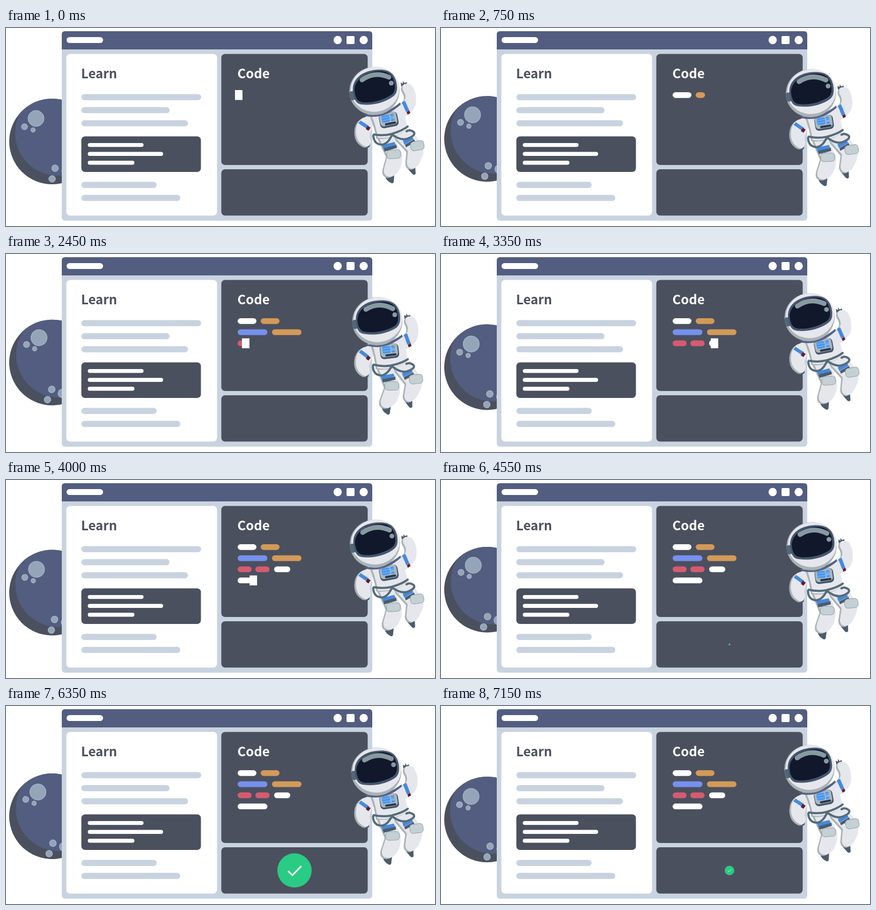
An HTML page that plays this animation: 800x370 px, repeating every 7.2 s.

```html
<!DOCTYPE html>
<html lang="en">
<head>
<meta charset="utf-8">
<title>Learn and code</title>
<style>
  html, body { margin: 0; height: 100%; overflow: hidden; background: #fff; }
  svg { display: block; width: 100%; height: 100%; }
  text { font: bold 24px "Noto Sans CJK JP", "Noto Sans CJK SC", "Noto Sans CJK", "Noto Sans", sans-serif; }
  .suit { fill: #e6e7ed; }
  .shade { fill: #a9b3b5; }
  .slate { fill: #4a5c6d; }
  .blue { fill: #4489e0; }
  .pad { fill: #c4d0d3; stroke: #91a1a8; }
  .strap { fill: none; stroke: #566b78; stroke-width: 4; stroke-linecap: round; stroke-linejoin: round; }
</style>
</head>
<body>
<svg viewBox="0 0 800 370">
  <defs>
    <clipPath id="disc"><circle r="80"/></clipPath>
    <path id="armL" d="M662 170Q651 178 651 194Q651 212 664 220Q671 225 676 220Q681 214 677 205Q676 200 680 191L685 177L676 164Z"/>
    <path id="armR" d="M733 148L741 166Q761 157 763 141Q765 121 755 108Q749 103 741 106Q736 110 739 118Q745 126 743 134Z"/>
    <path id="torso" d="M680 164L735 142Q743 164 748 190Q720 209 692 206Q689 186 680 164Z"/>
    <path id="legL" d="M694 206L722 204L737 236Q739 255 731 268Q721 282 709 278Q701 274 704 262L710 240Z"/>
    <path id="legR" d="M722 203L751 188L773 216Q781 231 773 246Q767 262 757 264Q747 264 746 253L748 231Z"/>
  </defs>

  <g id="moon">
    <circle r="80" fill="#4b505e"/>
    <circle cx="11" cy="-16" r="80" fill="#525d80" clip-path="url(#disc)"/>
    <g id="craters" fill="#95a5b9" stroke="#b0bdcc"></g>
  </g>

  <rect x="104" y="6" width="579" height="354" rx="6" fill="#c9d3e0"/>
  <path d="M104 40V12Q104 6 110 6H677Q683 6 683 12V40Z" fill="#525d80"/>
  <g fill="#fff">
    <rect x="113" y="17" width="68" height="11" rx="5.5"/>
    <circle cx="618.5" cy="22.5" r="7.7"/>
    <rect x="635" y="15" width="15" height="15" rx="2"/>
    <circle cx="667" cy="22.5" r="7.7"/>
    <rect x="112.500" y="48.500" width="281" height="302" rx="7"/>
  </g>
  <g fill="#4b505e">
    <rect x="401.500" y="48.500" width="273" height="207.500" rx="7"/>
    <rect x="401.500" y="264" width="273" height="86.500" rx="7"/>
    <rect x="140.500" y="202.500" width="223" height="66.500" rx="7"/>
    <text x="140" y="94">Learn</text>
  </g>
  <text x="431.500" y="94" fill="#fff">Code</text>
  <g id="lesson"></g>
  <g id="code"></g>
  <rect id="cursor" width="14" height="18.500" fill="#fff"/>
  <g id="tick">
    <circle r="32" fill="#2acb84"/>
    <path d="M-12 1L-4 9L12.500 -8" fill="none" stroke="#fff" stroke-width="3"/>
  </g>

  <g id="astronaut">
    <g class="slate">
      <path d="M707 277L724 274L723 288Q721 292 717 289Q709 285 707 277Z"/>
      <path d="M749 263L763 259L764 272Q762 276 758 273Z"/>
      <path d="M737 109L736 102L740 104L740 99L743 103L747 101L749 109Z"/>
      <path d="M666 218L679 215L678 222Q673 226 667 222Z"/>
    </g>
    <g id="body"></g>
    <g class="blue">
      <path d="M661 173L677 183L674 189L657 178Z"/>
      <path d="M738 139L744 136L752 154L746 157Z"/>
      <path d="M701 219L724 213L727 218L704 226Z"/>
      <path d="M740 211L757 202L760 208L743 218Z"/>
    </g>
    <path d="M674 183L680 186L676 192L671 189ZM747 157L752 154L754 159L749 162Z" fill="#681d2c"/>
    <path class="slate" d="M704 225L728 218L729 224L706 231ZM744 218L761 208L763 213L746 223Z"/>
    <g class="strap">
      <path d="M686 199Q704 202 719 198Q739 192 749 184"/>
      <path d="M685 201Q686 218 702 218Q713 216 720 199"/>
      <path d="M720 199Q739 213 753 205Q765 199 760 194Q753 189 747 193"/>
    </g>
    <rect class="pad" x="-13" y="-8" width="26" height="16" rx="6" transform="translate(723 236) rotate(-4)"/>
    <rect class="pad" x="-12.500" y="-8.500" width="25" height="17" rx="6" transform="translate(767 220) rotate(-10)"/>

    <g transform="translate(713 171) rotate(-11)">
      <rect x="-17" y="-12.500" width="35" height="27" rx="7" fill="#46566a"/>
      <rect x="-16" y="-13" width="32" height="24" rx="6" fill="#aab7bd"/>
      <rect x="-12" y="-9" width="15" height="13" rx="3" fill="#4597f3"/>
      <path d="M5 -9H11V-3H5ZM5 -1H11V4H5Z" fill="#4597f3"/>
      <path d="M-11 -5H11M-11 0H11" stroke="#86bdf8"/>
      <rect x="-8" y="6" width="21" height="4" rx="2" fill="#29374b"/>
    </g>

    <path d="M666 161Q704 166 735 139L736 143Q706 171 672 165Z" fill="#596086"/>
    <ellipse class="shade" cx="687" cy="117.500" rx="47" ry="45" transform="rotate(-12 687 117)"/>
    <ellipse class="suit" cx="688" cy="114.500" rx="45.500" ry="42" transform="rotate(-12 688 114)"/>
    <rect x="641" y="118" width="10" height="17" rx="4" fill="#536778" transform="rotate(-12 646 126)"/>
    <path d="M647 119C644 96 664 80 691 78C714 76 724 85 728 101C731 116 729 124 719 130C704 140 683 145 664 143C652 142 649 132 647 119Z" fill="#46566e"/>
    <path d="M650 119C648 99 667 84 691 81C711 79 720 86 724 101C727 114 725 122 715 127C700 136 682 140 666 139C655 138 652 130 650 119Z" fill="#11182b"/>
    <path d="M664 97Q687 80 714 92" fill="none" stroke="#8799a1" stroke-width="9" stroke-linecap="round"/>
    <circle cx="718.500" cy="103" r="4.500" fill="#8799a1"/>
  </g>
</svg>
<script>
const LOOP = 7200, FLOAT = 3600, BLINK = 800;
const WHITE = '#fff', GREY = '#c9d3e0', ORANGE = '#d39a59', BLUE = '#7690ee', RED = '#d55b70';
const $ = id => document.getElementById(id);
const clamp = x => Math.min(1, Math.max(0, x));

function add(parent, tag, attrs) {
  const el = document.createElementNS('http://www.w3.org/2000/svg', tag);
  for (const k in attrs) el.setAttribute(k, attrs[k]);
  return $(parent).appendChild(el);
}

const pill = (parent, x, end, y, h, fill) =>
  add(parent, 'rect', { x, y: y - h / 2, width: end - x, height: h, rx: h / 2, fill });

// Lesson lines: right end, middle
for (const [end, y] of [[364, 129.3], [305, 153.6], [339.5, 178], [281, 293.3], [325, 317.6]])
  pill('lesson', 140.5, end, y, 11.5, GREY);
for (const [end, y] of [[256.5, 218.6], [293, 235.2], [239.5, 251.8]])
  pill('lesson', 152.5, end, y, 7.4, WHITE);

// Craters relative to the moon's centre
for (const [cx, cy, r] of [[-30, -43, 15], [-51.5, -27.5, 5.7], [-35.5, -21.5, 4.2],
                           [5.5, 50, 6.3], [0, 70, 6.2], [26, 55, 8]])
  add('craters', 'circle', { cx, cy, r });

// Each part of the suit has a shaded left side
for (const part of ['legR', 'legL', 'armR', 'armL', 'torso']) {
  add('body', 'use', { href: '#' + part, class: 'shade', x: -1.5, y: 1 });
  add('body', 'use', { href: '#' + part, class: 'suit', x: 1.5, y: -1 });
}

// Typed lines: start and end time, then bars of [left, right, colour]
const lines = [
  [0, 970, [432, 467, WHITE], [475, 510, ORANGE]],
  [970, 2264, [432, 487.5, BLUE], [496, 551, ORANGE]],
  [2264, 3664, [432, 458, RED], [465, 491.5, RED], [500, 530, WHITE]],
  [3664, 4350, [432, 487.5, WHITE]]
].map(([from, to, ...bars], i) => {
  const y = 125.3 + i * 20.8;
  return {
    from, to, y, left: bars[0][0], right: bars.at(-1)[1],
    bars: bars.map(([x, end, fill]) => ({ x, end, el: pill('code', x, end, y, 10.8, fill) }))
  };
});

function type(t) {
  for (const { from, to, y, left, right, bars } of lines) {
    const head = left + (right - left) * clamp((t - from) / (to - from));
    for (const { x, end, el } of bars)
      el.setAttribute('width', Math.max(0, Math.min(head, end) - x));
    if (t >= from && t < to) {
      $('cursor').setAttribute('x', head - 5);
      $('cursor').setAttribute('y', y - 9.3);
    }
  }
  const shown = t < lines.at(-1).to && t % BLINK < BLINK / 2;
  $('cursor').setAttribute('visibility', shown ? 'visible' : 'hidden');
}

function draw(t) {
  const lift = (1 - Math.cos(2 * Math.PI * t / FLOAT)) / 2;
  $('moon').setAttribute('transform', `translate(86 ${212 - 13 * lift}) rotate(${10 * lift})`);
  $('astronaut').setAttribute('transform', `translate(0 ${13 * lift}) rotate(${6 * lift} 705 190)`);
  type(t);
  const grow = clamp((t - 4500) / 350), shrink = clamp((LOOP - t) / 180);
  $('tick').setAttribute('transform', `translate(538 307.3) scale(${grow * grow * (3 - 2 * grow) * shrink})`);
}

const start = performance.now();
function frame() {
  const t = (performance.now() - start) % LOOP;
  draw(Math.floor(t / 50) * 50);
  requestAnimationFrame(frame);
}
frame();
</script>
</body>
</html>
```
